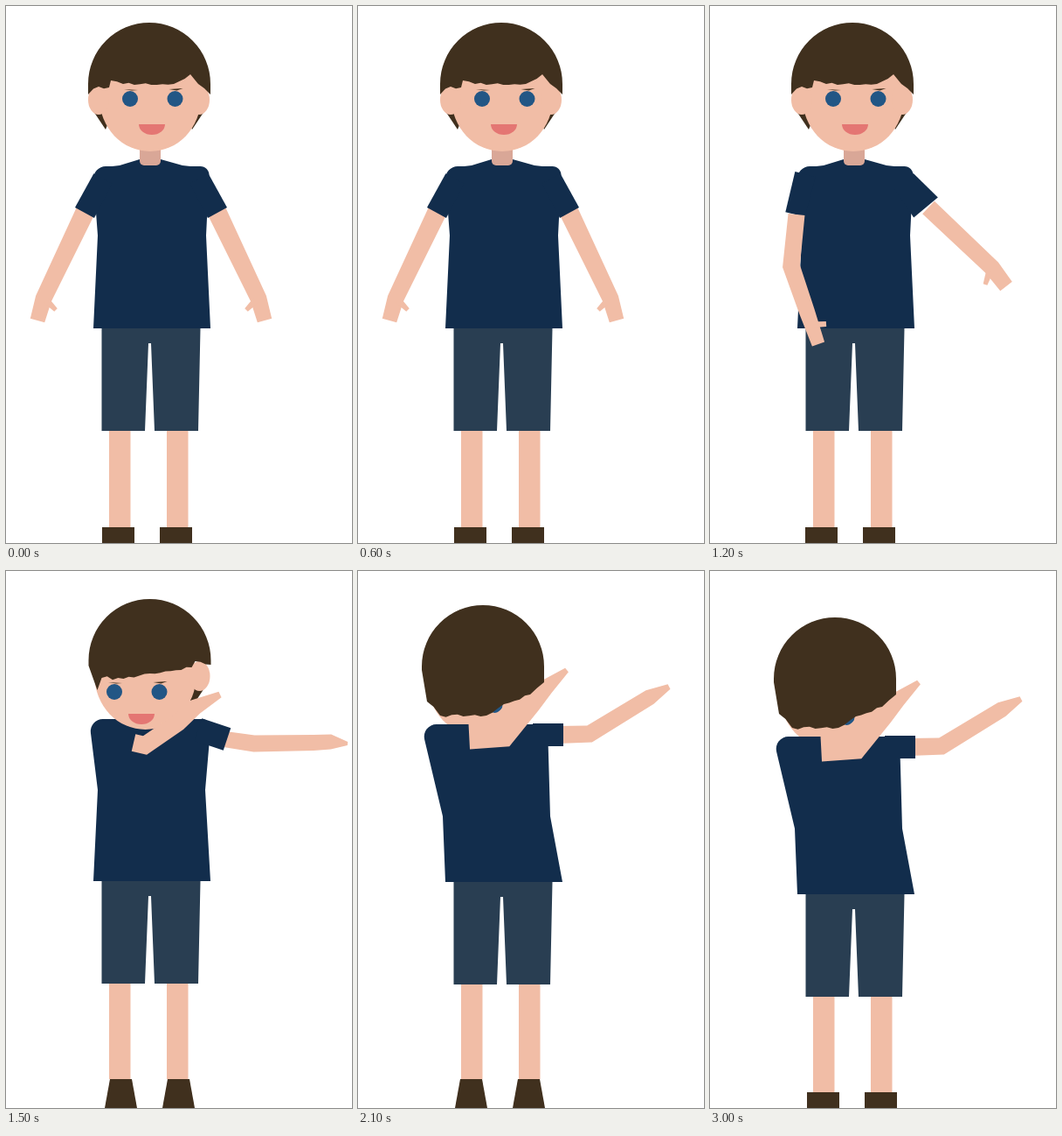
Animation of 396 by 613 pixels, one loop 5 s. Source, as an HTML page with a canvas:

```html
<!DOCTYPE html>
<html lang="en">
<head>
<meta charset="utf-8">
<title>Dance</title>
<style>
html, body { margin: 0; width: 100%; height: 100%; overflow: hidden; background: #fff; }
canvas { display: block; }
</style>
</head>
<body>
<canvas id="stage" width="396" height="613"></canvas>
<script>
const ctx = document.getElementById('stage').getContext('2d');
const HAIR = '#40301e', SKIN = '#f1bda6', SHIRT = '#122d4c', SHORTS = '#293e52';
const EYE = '#225685', MOUTH = '#e47673', NECK = '#d9a797';
const SKULL = 70, LOOP = 5000, BEAT = 300;

// A limb is a row of joints: x, y, width.
const flip = limb => limb.map(([x, y, w]) => [332 - x, y, w]);

const arm = [[91, 234, 22], [43, 334, 19], [36, 359, 17]];
const thumb = [[46, 336, 8], [57, 347, 5]];
const sleeve = [[111, 197, 24], [90, 236, 25]];

// Head offsets count from the centre of the skull.
const front = {
  x: 164, y: 89, turn: 0, face: [1, 16], eye: [-22, 17], ears: [[-58, 18], [57, 18]],
  hairline: [[-70, 12], [-58, 3], [-46, 4], [-44, -4], [-30, 0], [28, 0], [47, -11], [56, 0], [70, 12]]
};

const stand = {
  head: front,
  torso: { left: 99, right: 233, top: 183, waist: [105, 229, 262] },
  sleeves: [sleeve, flip(sleeve)],
  back: [arm, thumb, flip(arm), flip(thumb)],
  front: [],
  collar: true, hip: 368, shoes: 110
};

const swing = {
  ...stand,
  head: { ...front, x: 163 },
  sleeves: [[[109, 192, 24], [97.5, 238, 23]], [[222, 200, 28], [247, 230, 36]]],
  back: [[[250, 230, 20], [323, 299, 19], [339, 320, 17]], [[320, 303, 8], [315, 318, 5]]],
  front: [[[99, 238, 19], [93, 297, 20], [111, 349, 18], [124, 386, 15]], [[115, 364, 7], [133, 363, 6]]],
  shoes: 109
};

const turn = {
  head: {
    x: 164.5, y: 102, turn: 1, face: [-5, 18], eye: [-40.5, 36], ears: [[57, 18]],
    hairline: [[-70, 6], [-60, 34], [-55, 20], [-30, 21], [0, 15], [48, 8], [52, 1], [70, 5]]
  },
  torso: { left: 95, right: 235, top: 169, waist: [105, 228, 250] },
  sleeves: [[[220, 181, 27], [253, 192, 27]]],
  back: [[[250, 192, 18], [284, 197, 19], [352, 196, 18], [372, 195, 17], [391, 197, 4]]],
  front: [[[146, 196, 20], [159, 199, 22], [197, 173, 20], [217, 155, 18], [245, 141, 7]]],
  hip: 354, shoes: 113, onToes: true
};

const duck = {
  head: {
    x: 164.5, y: 116, turn: 2, face: [-4, 18], eye: [-38, 50], ears: [[55, 27]],
    hairline: [[-70, 6], [-55, 41], [-14, 44], [27, 37], [47, 22], [56, 13], [70, 14]]
  },
  tucked: true,
  torso: { left: 94, right: 238, top: 184, waist: [109, 236, 298] },
  sleeves: [[[225, 198.5, 29], [257, 198.5, 29]]],
  back: [[[250, 198, 18], [288, 198, 20], [363, 160, 16], [384, 153, 5]]],
  front: [[[151, 196, 27], [186, 196, 27], [237, 164, 20], [255, 151, 16], [273, 140, 6]]],
  hip: 369, shoes: 112
};

const dab = {
  head: {
    x: 143, y: 123, turn: 2, face: [-5, 18], eye: [-38, 44], ears: [[50, 8]],
    hairline: [[-70, 4], [-64, 40], [-49, 56], [4, 56], [24, 43], [54, 32], [70, 18]]
  },
  tucked: true,
  torso: { left: 72, right: 217, top: 189, waist: [97, 220, 294] },
  sleeves: [[[200, 201, 26], [235, 201, 26]]],
  back: [[[228, 201, 20], [265, 200, 20], [334, 158, 18], [356, 146, 6]]],
  front: [[[127, 198, 39], [165, 196, 40], [197, 163, 28], [216, 146, 18], [239, 127, 6]]],
  hip: 369, shoes: 111
};

function fill(color, path) {
  ctx.fillStyle = color;
  ctx.beginPath();
  path();
  ctx.fill();
}

const poly = (color, ...pts) => fill(color, () => pts.forEach(p => ctx.lineTo(...p)));

const oval = (color, x, y, rx, ry = rx, end = Math.PI * 2) =>
  fill(color, () => ctx.ellipse(x, y, rx, ry, 0, 0, end));

// Outlines the joints, each offset along the normal between its neighbours.
function drawLimb(color, joints) {
  const side = sign => joints.map(([x, y, w], i) => {
    const [ax, ay] = joints[Math.max(i - 1, 0)];
    const [bx, by] = joints[Math.min(i + 1, joints.length - 1)];
    const a1 = i ? Math.atan2(y - ay, x - ax) : Math.atan2(by - y, bx - x);
    const a2 = i < joints.length - 1 ? Math.atan2(by - y, bx - x) : a1;
    const angle = Math.atan2(Math.sin(a1) + Math.sin(a2), Math.cos(a1) + Math.cos(a2));
    return [x - sign * Math.sin(angle) * w / 2, y + sign * Math.cos(angle) * w / 2];
  });
  poly(color, ...side(1), ...side(-1).reverse());
}

function drawFace({ x, y, turn, face, eye, ears }) {
  ears.forEach(([ex, ey]) => {
    const s = Math.sign(ex), cx = x + ex, cy = y + ey;
    poly(HAIR, [cx + 6 * s, cy + 13], [cx - 8 * s, cy + 34], [cx - 16 * s, cy + 14]);
  });
  oval(SKIN, x + face[0], y + face[1], 58, 61);
  ears.forEach(([ex, ey]) => oval(SKIN, x + ex, y + ey, 12, 17));

  const left = x + eye[0], ly = y + eye[1];
  [left, left + 51.5].forEach((cx, i) => {
    const s = i ? 1 : -1;
    oval(EYE, cx, ly, 9);
    poly(HAIR, [cx - 7, ly - 11], [cx + 9, ly - 11 - s], [cx + 2, ly - 9.5]);
  });
  oval(MOUTH, left + 25 + 6 * turn, ly + 29 - 4 * turn, 15, 12, Math.PI);
}

// Skull cap closed by a ragged hairline.
function drawHair({ x, y, hairline }) {
  let seed = 7;
  const random = () => (seed = seed * 16807 % 2147483647) / 2147483647;
  fill(HAIR, () => {
    ctx.arc(x, y, SKULL, 0, Math.PI, true);
    hairline.forEach(([px, py], i) => {
      ctx.lineTo(x + px, y + py);
      const [qx, qy] = hairline[i + 1] || [px, py];
      const n = Math.floor(Math.abs(qx - px) / 6);
      for (let k = 1; k < n; k++) {
        const t = k / n;
        ctx.lineTo(x + px + (qx - px) * t, y + py + (qy - py) * t + random() * 4 - 2);
      }
    });
  });
}

function drawShirt({ torso, sleeves, collar, hip }) {
  const { left, right, top, waist: [wl, wr, wy] } = torso;
  fill(SHIRT, () => {
    ctx.moveTo(100, hip);
    ctx.lineTo(wl, wy);
    ctx.arcTo(left, top, right, top, 14);
    ctx.arcTo(right, top, wr, wy, 10);
    ctx.lineTo(wr, wy);
    ctx.lineTo(234, hip);
  });
  sleeves.forEach(s => drawLimb(SHIRT, s));
  if (collar) {
    poly(SHIRT, [113, 184], [130, 182], [153, 175], [177, 175], [202, 182], [220, 184]);
    fill(NECK, () => ctx.roundRect(153, 150, 24, 32, 5));
  }
}

function drawLegs({ hip, shoes, onToes }, lift) {
  const y = hip - lift, raised = onToes || lift > 0;
  const ankle = raised ? 580 : 595, inset = raised ? 6 : 0;
  [118, 184].forEach((x, i) => {
    ctx.fillStyle = SKIN;
    ctx.fillRect(x, y + 110, 24.5, ankle - y - 110);
    const s = shoes + i * 66;
    poly(HAIR, [s + inset, ankle], [s + 37 - inset, ankle], [s + 37, 613], [s, 613]);
  });
  poly(SHORTS, [109.5, y], [222.5, y], [220, y + 117], [170, y + 117],
    [166, y + 17], [163, y + 17], [159, y + 117], [109.5, y + 117]);
}

function drawBody(pose) {
  pose.back.forEach(l => drawLimb(SKIN, l));
  if (pose.tucked) drawFace(pose.head);
  drawShirt(pose);
  if (!pose.tucked) drawFace(pose.head);
  pose.front.forEach(l => drawLimb(SKIN, l));
  drawHair(pose.head);
}

const steps = [
  [stand, 0], [stand, 13], [stand, 0], [stand, 13], [swing, 0], [turn, 0],
  [duck, 0], [dab, 14], [dab, 0], [dab, 14], [dab, 0]
];

function draw(time) {
  const beat = Math.floor(time % LOOP / BEAT);
  const [pose, lift] = steps[Math.min(beat, steps.length - 1)];
  ctx.fillStyle = '#fff';
  ctx.fillRect(0, 0, 396, 613);
  drawLegs(pose, lift);
  ctx.save();
  ctx.translate(0, -lift);
  drawBody(pose);
  ctx.restore();
}

const start = performance.now();
function tick() {
  draw(performance.now() - start);
  requestAnimationFrame(tick);
}
tick();
</script>
</body>
</html>
```
